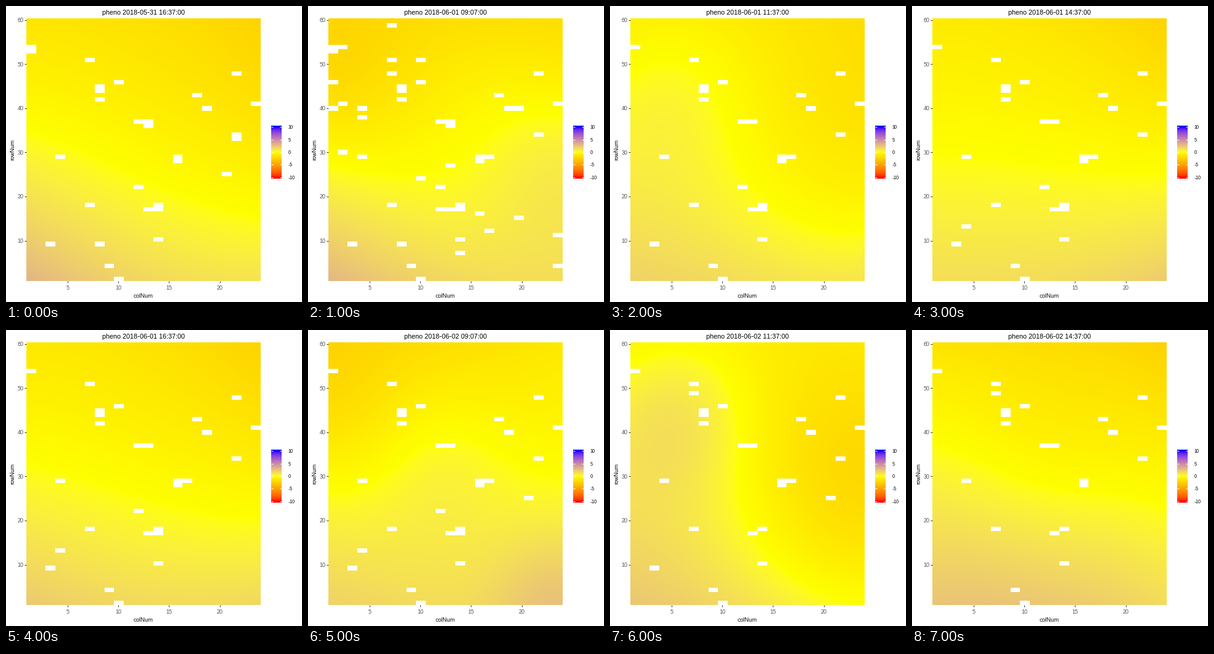
Write a matplotlib script that moves like this. It is 480x480 px and loops after 8 s.

```python
import numpy as np
import matplotlib.pyplot as plt
from matplotlib.animation import FuncAnimation

# Whole-pixel glyph hinting keeps the small lettering crisp.
plt.rcParams["text.hinting"] = "native"
plt.rcParams["text.hinting_factor"] = 1

SIZE, DPI = 480, 96
LEFT, RIGHT, TOP, BOTTOM = 33, 413, 20, 446
COLS, ROWS = 24, 60
CELL_X, CELL_Y = 15.855, 7.0975


# --- colour scale: red - yellow - blue, mixed in CIE Lab ---
TO_XYZ = np.array([[.4124, .3576, .1805], [.2126, .7152, .0722], [.0193, .1192, .9505]])
WHITE = TO_XYZ.sum(axis=1)


def to_lab(rgb):
    x, y, z = np.cbrt(np.maximum(TO_XYZ @ np.array(rgb, float) / WHITE, 1e-9))
    return np.array([116 * y - 16, 500 * (x - y), 200 * (y - z)])


def to_rgb(lab):
    fy = (lab[..., 0] + 16) / 116
    f = np.stack([fy + lab[..., 1] / 500, fy, fy - lab[..., 2] / 200], axis=-1)
    xyz = np.where(f > 6 / 29, f ** 3, (f - 4 / 29) * 108 / 841) * WHITE
    lin = np.clip(xyz @ np.linalg.inv(TO_XYZ).T, 0, 1)
    return np.where(lin > .0031308, 1.055 * lin ** (1 / 2.4) - .055, 12.92 * lin)


RED, YELLOW, BLUE = (to_lab(c) for c in [(1, 0, 0), (1, 1, 0), (0, 0, 1)])


def colour(v):
    t = np.clip(v / 10, -1, 1)[..., None]
    end = np.where(t < 0, RED, BLUE)
    return np.clip(to_rgb(YELLOW + np.abs(t) * (end - YELLOW)), 0, 1)


# --- surfaces over the field: x to the right, y upwards, both 0 to 1 ---
x, y = np.meshgrid((np.arange(RIGHT - LEFT) + .5) / (RIGHT - LEFT),
                   1 - (np.arange(BOTTOM - TOP) + .5) / (BOTTOM - TOP))


def slope(bottom, top, bend):
    return bottom + (top - bottom) * y * (1 + bend - bend * y)


def bump(cx, cy, width):
    return np.exp(-((x - cx) ** 2 + (y - cy) ** 2) / width ** 2)


evening = slope(1.2 + 2 * (1 - x) ** 2, -1.4 - x ** 2, .5)
afternoon = slope(1.4 + .8 * x ** 3, -1.1 - 1.3 * x ** 2, .3)
afternoon2 = slope(2.65 - 2 * (x - .25) ** 2, -1.4 - x ** 3, -.15) - .9 * bump(.5, .55, .45)
morning = (slope(1.2 + 1.9 * (1 - x) ** 2, -1.9, .5) + 1.3 * bump(1, .45, .35)
           + .4 * bump(.65, .7, .3) - .8 * bump(0, .75, .3))
morning2 = (slope(1.9 - 1.1 * x, -2 + .8 * x ** 2, 0) + .75 * bump(.5, .55, .3)
            + 1.8 * bump(1, 0, .3) - .8 * bump(0, .75, .3))
noon2 = (slope(2.5 - .5 * x, -.9 + .8 * x, 0) + 1.5 * bump(.2, .72, .32)
         - 3.1 * bump(1, .4, .6))

STEPS = [
    ("2018-05-31 16:37:00", evening),
    ("2018-06-01 09:07:00", morning),
    ("2018-06-01 11:37:00", (noon2 + afternoon) / 2),
    ("2018-06-01 14:37:00", afternoon),
    ("2018-06-01 16:37:00", (evening + afternoon) / 2),
    ("2018-06-02 09:07:00", morning2),
    ("2018-06-02 11:37:00", noon2),
    ("2018-06-02 14:37:00", afternoon2),
]

# --- missing plots (column, row), grouped by first and last step ---
rng = np.random.default_rng(5)
GAPS = {
    (0, 7): [(1, 54), (7, 51), (22, 48), (10, 46), (8, 45), (8, 44), (18, 43),
             (8, 42), (24, 41), (19, 40), (12, 37), (13, 37), (22, 34), (4, 29),
             (16, 29), (16, 28), (7, 18), (14, 18), (13, 17), (14, 10), (9, 4), (10, 1)],
    (0, 6): [(3, 9)],
    (0, 5): [(12, 22), (14, 17)],
    (0, 1): [(1, 53), (13, 36), (8, 9)],
    (0, 0): [(22, 33), (21, 25)],
    (1, 6): [(17, 29)],
    (1, 1): zip(rng.integers(1, COLS + 1, 20), rng.integers(1, ROWS + 1, 20)),
    (3, 5): [(4, 13)],
    (5, 6): [(21, 25)],
    (6, 7): [(7, 49)],
}


def blank(img, col, row):
    x0 = 32.7 - LEFT + (col - 1) * CELL_X
    y0 = 20.5 - TOP + (ROWS - row) * CELL_Y
    img[round(y0):round(y0 + CELL_Y), max(0, round(x0)):round(x0 + CELL_X)] = 1


heatmaps = [colour(field) for _, field in STEPS]
for (first, last), plots in GAPS.items():
    for col, row in plots:
        for img in heatmaps[first:last + 1]:
            blank(img, col, row)


# --- stage in pixel coordinates ---
fig = plt.figure(figsize=(SIZE / DPI, SIZE / DPI), dpi=DPI, facecolor="white")
ax = fig.add_axes([0, 0, 1, 1])
ax.axis("off")


def label(px, py, s, size, color="black", **kw):
    kw = {"ha": "center", "va": "baseline", **kw}
    return ax.text(px, py, s, fontsize=size * 72 / DPI, color=color,
                   family="Liberation Sans", **kw)


def line(xs, ys, color):
    ax.plot(xs, ys, color=color, lw=72 / DPI, solid_capstyle="butt")


def picture(img, extent):
    return ax.imshow(img, extent=extent, interpolation="nearest", aspect="auto")


surface = picture(heatmaps[0], (LEFT, RIGHT, BOTTOM, TOP))
title = label(223, 14, "", 11)

for row in range(10, 61, 10):
    ty = 452.1 - 7.16 * row
    line([30, LEFT], [ty, ty], "#333333")
    label(28.5, round(ty + 3.4), str(row), 9, "#4d4d4d", ha="right")
for col in range(5, 21, 5):
    tx = 17.5 + 16.45 * col
    line([tx, tx], [BOTTOM, BOTTOM + 3], "#333333")
    label(tx, 460, str(col), 9, "#4d4d4d")
label(223, 473, "colNum", 9)
label(11, 233, "rowNum", 9, rotation=90, va="center")

picture(colour(np.linspace(10.5, -10.5, 86)[:, None]), (430, 447, 280, 194))
for v in range(-10, 11, 5):
    ty = 237 - 4.07 * v
    for tx in (430, 443.6):
        line([tx, tx + 3.4], [ty, ty], "white")
    label(458, round(ty + 2.9), str(v), 8, ha="left")

ax.set_xlim(0, SIZE)
ax.set_ylim(SIZE, 0)


def draw(i):
    title.set_text("pheno " + STEPS[i][0])
    surface.set_data(heatmaps[i])
    return surface, title


anim = FuncAnimation(fig, draw, frames=len(STEPS), interval=1000,
                     repeat=True, repeat_delay=0, blit=False)
plt.show()
```
